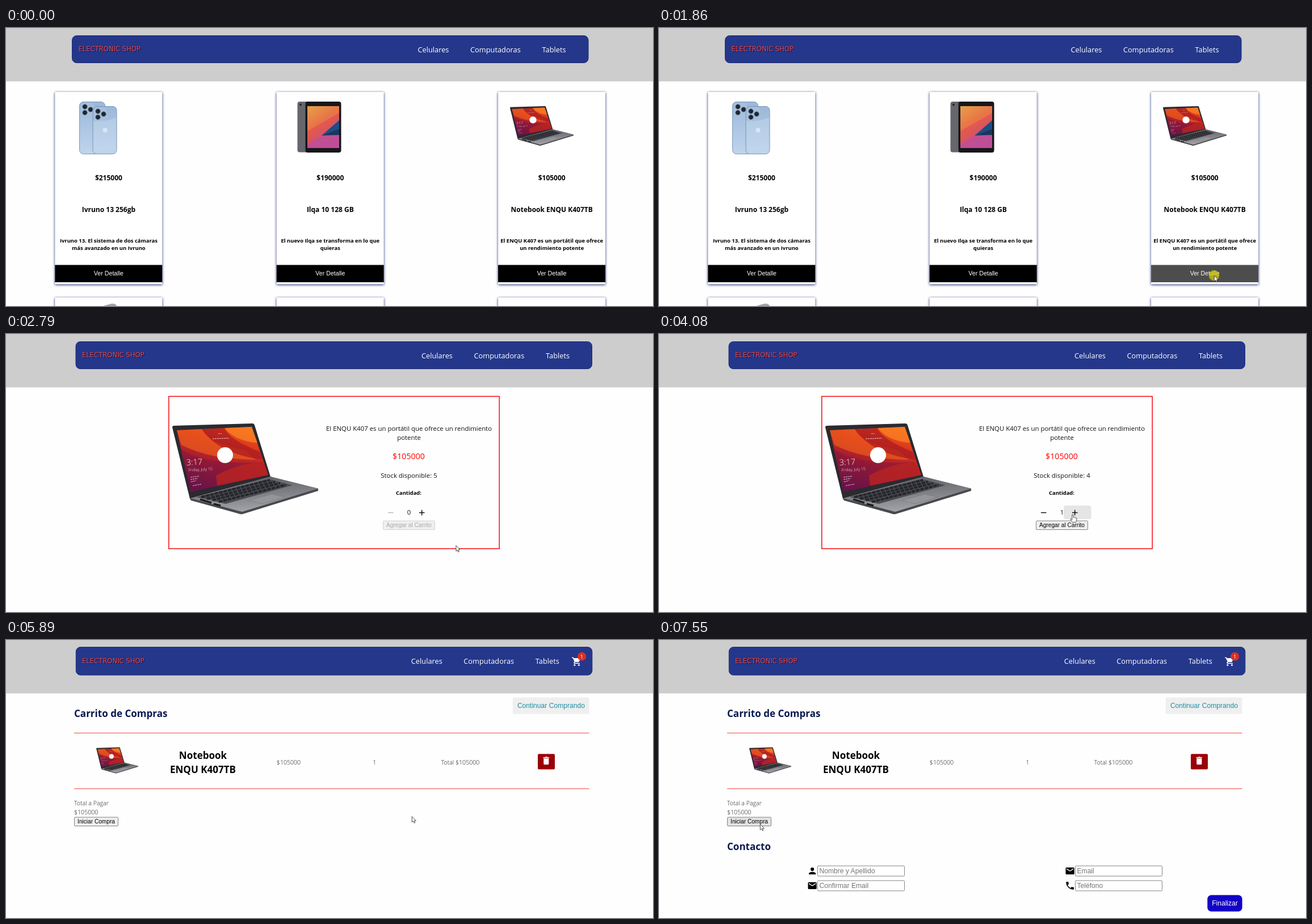
Animation of 1140 by 491 pixels, one loop 8000 ms. Source, as an HTML page:

```html
<!DOCTYPE html>
<html lang="es">
<head>
<meta charset="utf-8">
<title>Tienda</title>
<style>
html, body { margin: 0; width: 100%; height: 100%; overflow: hidden; background: #fefefe; }
svg { display: block; width: 100%; height: 100%; }
text { font-family: "Open Sans", "Noto Sans", sans-serif; }
.mid { text-anchor: middle; }
.bold { font-weight: 700; }
.ui { font-family: "Liberation Sans", Arial, sans-serif; font-size: 10.15px; }
.field { font-family: "Liberation Sans", Arial, sans-serif; font-size: 12.1px; }
.nav { font-size: 12.8px; fill: #fff; }
.logo text { font: 11.6px "DejaVu Sans", sans-serif; }
.price { font-size: 12px; }
.desc { font-size: 9.43px; }
.body { font-size: 11.4px; fill: #111; }
.title { font-size: 17.05px; font-weight: 700; }
.thin { font-size: 10.6px; font-weight: 300; fill: #222; }
.card { fill: #fff; filter: drop-shadow(0 1.5px 2.2px #16256e); }
.btn { fill: #efefef; stroke: #767676; stroke-width: .9; }
.input { fill: #fff; stroke: #858585; stroke-width: 1; }
.outline { fill: #fefefe; stroke: #f20d12; stroke-width: 1.5; }
</style>
</head>
<body>
<svg viewBox="0 0 1140 491" preserveAspectRatio="none">
  <defs>
    <linearGradient id="blue" x2="0" y2="1"><stop stop-color="#9bb8d9"/><stop offset="1" stop-color="#bfd4ec"/></linearGradient>
    <linearGradient id="sunset" x2=".5" y2="1"><stop stop-color="#e5a04a"/><stop offset=".45" stop-color="#e85b45"/><stop offset="1" stop-color="#c54c80"/></linearGradient>
    <linearGradient id="lava" x1=".7" y1="0" x2=".3" y2="1"><stop stop-color="#ee5a1a"/><stop offset=".3" stop-color="#d5301e"/><stop offset=".6" stop-color="#a01c30"/><stop offset="1" stop-color="#561250"/></linearGradient>
    <linearGradient id="metal" x1=".4" x2=".6" y2="1"><stop stop-color="#606166"/><stop offset=".5" stop-color="#808186"/><stop offset="1" stop-color="#a6a7ab"/></linearGradient>

    <g id="camera">
      <rect width="23" height="24" rx="6" fill="#a7c0dd"/>
      <g fill="#1d2530" stroke="#64788f"><circle cx="7" cy="7" r="4.2"/><circle cx="7" cy="17.5" r="4.2"/><circle cx="17" cy="12" r="4.2"/></g>
    </g>
    <g id="phones">
      <rect x="129.5" y="130.5" width="45" height="92" rx="7" fill="url(#blue)" stroke="#7c98b8"/>
      <use href="#camera" x="132" y="132"/>
      <rect x="153" y="138.5" width="42" height="84" rx="7" fill="url(#blue)" stroke="#7c98b8"/>
      <path d="M154 164q20 3 40-6v56q-20 6-40 4z" fill="#c6d9ee" opacity=".45"/>
      <use href="#camera" x="155" y="140"/>
      <circle cx="174.5" cy="180.5" r="4" fill="#dbe6f2"/>
    </g>
    <g id="tablet">
      <rect x="513.5" y="130" width="30" height="89.5" rx="4" fill="#65676c"/>
      <circle cx="519" cy="135.5" r="2" fill="#24262a"/>
      <rect x="527.5" y="130" width="63" height="90" rx="4" fill="#16171b"/>
      <rect x="531" y="138" width="56" height="74" fill="url(#sunset)"/>
      <path d="M556 190L587 163V178z" fill="#1c4d87"/>
      <path d="M556 190L587 178V189z" fill="#17365f"/>
      <path d="M531 206L556 190 587 189V212H531z" fill="#bd4f9d" opacity=".8"/>
      <path d="M531 138H587V150L531 182z" fill="#e9a348" opacity=".35"/>
    </g>
    <g id="laptop">
      <path d="M293 165Q293 162 296 162L434 158Q437 158 438 161L466 252 324 291z" fill="#2a2a2f"/>
      <path d="M301 170L433 164 462 249 325 279z" fill="url(#lava)"/>
      <path d="M301 170L345 168Q355 192 420 205L440 222Q360 222 309 196z" fill="#f0601c" opacity=".65"/>
      <path d="M345 168L385 166Q392 186 447 208L452 222Q375 212 345 168z" fill="#a81a22" opacity=".7"/>
      <path d="M385 166L433 164 443 192Q405 190 385 166z" fill="#ff8a26" opacity=".65"/>
      <path d="M309 204Q350 232 450 226L462 249 325 279z" fill="#7a1440" opacity=".45"/>
      <path d="M370 250Q410 228 454 226L462 249 372 268z" fill="#c0261f" opacity=".7"/>
      <path d="M324 291L466 252 550 273V277L417 318Q413 319 409 317L326 294z" fill="#48494e"/>
      <path d="M325 290L466 252 550 273 416 314z" fill="url(#metal)"/>
      <path d="M336 288L463 256 505 267 387 300z" fill="#4b4c51"/>
      <g stroke="#25262b" stroke-width="4" stroke-dasharray="6.5 1.5">
        <path d="M344 288L465 258M354 291L474 261M364 293.5L483 263.5M375 296.5L493 266.5"/>
      </g>
      <path d="M428 294L468 283 491 288 452 300z" fill="#94959a" stroke="#7c7d82" stroke-width=".7"/>
      <path d="M342 292L362 298M366 300L378 303" stroke="#17181b" stroke-width="3"/>
      <circle cx="386" cy="214" r="14" fill="#fff"/>
      <g fill="#fff" transform="rotate(-3 317 232)">
        <text x="318" y="232" font-size="14.5" font-weight="300">3:17</text>
        <text x="321" y="243" font-size="7" font-weight="300">Friday, July 15</text>
      </g>
      <path d="M325 253L341 251M325 257L338 255M326 261L335 259M329 268L345 265M364 185L393 184M374 176h6" stroke="#fff" opacity=".65" stroke-width="1.2" stroke-dasharray="3 1"/>
    </g>

    <path id="person" d="M12 12a4 4 0 1 0 0-8 4 4 0 0 0 0 8zm0 2c-2.7 0-8 1.3-8 4v2h16v-2c0-2.7-5.3-4-8-4z"/>
    <path id="mail" d="M20 4H4a2 2 0 0 0-2 2v12a2 2 0 0 0 2 2h16a2 2 0 0 0 2-2V6a2 2 0 0 0-2-2zm0 4-8 5-8-5V6l8 5 8-5z"/>
    <path id="tel" d="M6.6 10.8a15 15 0 0 0 6.6 6.6l2.2-2.2a1 1 0 0 1 1-.3 11 11 0 0 0 3.6.6 1 1 0 0 1 1 1V20a1 1 0 0 1-1 1A17 17 0 0 1 3 4a1 1 0 0 1 1-1h3.5a1 1 0 0 1 1 1 11 11 0 0 0 .6 3.6 1 1 0 0 1-.3 1z"/>
    <path id="trash" d="M6 19a2 2 0 0 0 2 2h8a2 2 0 0 0 2-2V7H6zM19 4h-3.5l-1-1h-5l-1 1H5v2h14z"/>
    <g id="trolley"><circle cx="7" cy="20" r="2"/><circle cx="17" cy="20" r="2"/><path d="M1 2v2h2l3.6 7.6-1.4 2.4C4.500 15.4 5.500 17 7 17h12v-2H7l1.1-2h7.5a2 2 0 0 0 1.7-1L21.7 4H5.200l-.9-2z"/></g>

    <g id="brand" class="logo"><text x="128.500" y="41.500" fill="#10143c">ELECTRONIC SHOP</text><text x="127.500" y="41" fill="#e5484a">ELECTRONIC SHOP</text></g>
    <g id="links" class="nav"><text x="725.5" y="43">Celulares</text><text x="818" y="43">Computadoras</text><text x="944.5" y="43">Tablets</text></g>
    <g id="topbar">
      <rect x="116.5" y="13.5" width="909.5" height="48" rx="8" fill="#24378b" stroke="#1b2b72"/>
      <use href="#brand"/><use href="#links"/>
    </g>
    <g id="info" class="mid">
      <text class="body" x="710" y="171">El ENQU K407 es un portátil que ofrece un rendimiento</text>
      <text class="body" x="710" y="187">potente</text>
      <text x="709.5" y="221" font-size="14.2" fill="#f00">$105000</text>
    </g>
    <g id="frame">
      <rect class="outline" x="286.8" y="110.2" width="582.4" height="269"/>
      <use href="#laptop"/>
    </g>
  </defs>

  <rect width="1140" height="491" fill="#fefefe"/>
  <rect width="1140" height="94.300" fill="#cdcdcd"/>

  <g id="shop">
    <use href="#topbar"/>
    <g id="cards"></g>
    <use href="#phones"/><use href="#tablet"/>
    <use href="#laptop" transform="translate(888 138) scale(.436) translate(-293 -158)"/>
    <path d="M171 491l14-4q8-1 10 4z" fill="#a3a5ab"/>
  </g>

  <use id="shifted" href="#topbar" x="6.5"/>
  <rect id="loading" class="outline" x="286.8" y="110.2" width="582.4" height="20"/>

  <g id="detail">
    <use href="#frame"/><use href="#info"/>
    <text id="stock" class="body mid" x="710" y="253.5"></text>
    <text class="bold mid" x="709.5" y="284" font-size="9.4">Cantidad:</text>
    <rect id="plusHover" x="713" y="303" width="48.5" height="24" rx="3.5" fill="#e5e5e5"/>
    <path id="minus" d="M673 315.5h9.5" stroke-width="1.5"/>
    <path d="M728 315.5h9.5M732.7 310.7v9.5" stroke="#111" stroke-width="1.5"/>
    <text id="count" class="body mid" x="710" y="318.5"></text>
    <rect id="addBtn" class="btn" x="664.5" y="330" width="91" height="15.5" rx="1.5"/>
    <text id="addText" class="ui mid" x="710" y="341">Agregar al Carrito</text>
  </g>

  <g id="added">
    <use href="#frame"/><use href="#info" y="29.5"/>
    <text class="body mid" x="710" y="283">Stock disponible: 4</text>
    <rect id="goBtn" class="btn" x="680.5" y="300.5" width="59" height="15.5" rx="1.5"/>
    <text class="ui mid" x="710" y="311.8">Ir al carrito</text>
  </g>

  <g id="cart">
    <rect x="123.3" y="12.5" width="909.5" height="49.5" rx="8" fill="#24378b" stroke="#1b2b72"/>
    <use href="#brand" x="6.5"/><use href="#links" x="-11.7" y="-.6"/>
    <use href="#trolley" fill="#fff" transform="translate(996.5 29) scale(.761)"/>
    <circle cx="1014.7" cy="29" r="7.6" fill="#d93025"/>
    <text class="mid" x="1014.7" y="32.5" font-size="9" fill="#fff">1</text>

    <text class="title" x="120" y="136" fill="#0a1850">Carrito de Compras</text>
    <rect x="893" y="101.5" width="134.5" height="29" fill="#efefef"/>
    <text class="field mid" x="960.4" y="120" fill="#1f8ea3">Continuar Comprando</text>
    <path d="M120 164.3H1027.5M120 262.7H1027.5" stroke="#f96464" stroke-width="1.2"/>
    <use href="#laptop" transform="translate(159 189.5) scale(.288) translate(-293 -158)"/>
    <text class="title mid" x="347" y="210">Notebook</text>
    <text class="title mid" x="347" y="234.5">ENQU K407TB</text>
    <text class="thin mid" x="498" y="220">$105000</text>
    <text class="thin mid" x="649.5" y="220">1</text>
    <text class="thin mid" x="800.5" y="220">Total $105000</text>
    <rect x="937" y="201.3" width="30" height="27.3" rx="2" fill="#9a0008"/>
    <use href="#trash" fill="#fff" transform="translate(942.7 204) scale(.761)"/>
    <text class="thin" x="120" y="291.5">Total a Pagar</text>
    <text class="thin" x="120" y="307.5">$105000</text>
    <rect id="buyBtn" class="btn" x="120.5" y="313" width="77" height="15.5" rx="1.5"/>
    <text class="ui mid" x="159" y="324.4">Iniciar Compra</text>
  </g>

  <g id="form">
    <text class="title" x="120" y="371" fill="#0a1850">Contacto</text>
    <g id="fields"></g>
    <rect x="966.3" y="450.5" width="61.3" height="29" rx="7" fill="#1400c8"/>
    <text class="field mid" x="997" y="469" fill="#fff">Finalizar</text>
  </g>

  <g id="cursor">
    <circle id="ring" r="9.2" fill="#d2c800" opacity=".75"/>
    <path id="arrow" d="M.3.3v10l2.3-2 1.6 3.5 1.6-.7-1.5-3.400h3.1z" fill="#fff" stroke="#222" stroke-width=".8"/>
    <path id="hand" d="M-1.2.5Q0-.7 1.200.5V5Q2.500 4 3.400 5.300 4.700 4.600 5.300 5.800 6.800 5.400 6.900 7V9.500L5.500 13.500H-.5L-4 9Q-4.300 7.300-2.700 7.700L-1.200 9z" fill="#fff" stroke="#222" stroke-width=".8"/>
  </g>
</svg>
<script>
const LOOP = 8000;
const $ = id => document.getElementById(id);
const show = (id, on) => $(id).setAttribute('visibility', on ? 'inherit' : 'hidden');
const within = (t, from, to) => t >= from && t < to;

const products = [
  ['$215000', 'Ivruno 13 256gb', 'Ivruno 13. El sistema de dos cámaras', 'más avanzado en un Ivruno'],
  ['$190000', 'Ilqa 10 128 GB', 'El nuevo Ilqa se transforma en lo que', 'quieras'],
  ['$105000', 'Notebook ENQU K407TB', 'El ENQU K407 es un portátil que ofrece', 'un rendimiento potente'],
];
$('cards').innerHTML = products.map(([price, name, line1, line2], i) => {
  const x = 86.3 + i * 390.4, c = x + 94.6;
  const label = (y, cls, s) => `<text class="mid bold ${cls}" x="${c}" y="${y}">${s}</text>`;
  return `<rect class="card" x="${x}" y="113" width="189" height="339.5"/>
    <rect class="card" x="${x}" y="476" width="189" height="60"/>
    ${label(269, 'price', price)}${label(325, 'price', name)}
    ${label(379.3, 'desc', line1)}${label(392.3, 'desc', line2)}
    <rect id="view${i}" x="${x}" y="418.5" width="189" height="30.5"/>
    <text class="ui mid" style="font-size:10.65px" x="${c}" y="437.3" fill="#fff">Ver Detalle</text>`;
}).join('');

const fields = [
  [279, 398.5, 'person', 'Nombre y Apellido'], [733, 398.5, 'mail', 'Email'],
  [279, 424.5, 'mail', 'Confirmar Email'], [733, 424.5, 'tel', 'Teléfono'],
];
$('fields').innerHTML = fields.map(([x, y, icon, hint]) => `
  <use href="#${icon}" transform="translate(${x - 18} ${y + .3}) scale(.761)"/>
  <rect class="input" x="${x + .5}" y="${y + .5}" width="153" height="18" rx="1.5"/>
  <text class="field" x="${x + 3.5}" y="${y + 13.7}" fill="#757575">${hint}</text>`).join('');

// Pointer moves: first change, last change, steps, target, ease-out power
const start = [1076, 508];
const moves = [
  [440, 1180, 12, 978, 437, 3.4],
  [2450, 2590, 3, 818, 393, 1],
  [2790, 3550, 12, 719, 316, 3.4],
  [3680, 3810, 3, 729, 319, 1],
  [4150, 4480, 6, 728, 341.5, 1.5],
  [5270, 5480, 4, 715, 311.5, 1.5],
  [6220, 6350, 3, 334, 334, 1],
  [6610, 7350, 12, 178, 325, 3],
];
// Time spans in which a click ring surrounds the pointer
const clicks = [[1720, 1920], [3880, 4010], [4680, 4810], [5690, 5890], [7350, 7550]];

function pointer(t) {
  let [x, y] = start;
  for (const [from, to, steps, tx, ty, power] of moves) {
    if (t < from) break;
    const done = Math.min(steps, 1 + Math.floor((t - from) / (to - from) * (steps - 1) + 1e-6));
    const k = 1 - (1 - done / steps) ** power;
    x += (tx - x) * k;
    y += (ty - y) * k;
  }
  return [x, y];
}

function render(t) {
  const [x, y] = pointer(t);
  const over = (l, top, r, b) => x >= l && x < r && y >= top && y < b;
  const tone = (id, hover) => $(id).style.fill = hover ? '#e3e3e3' : '#efefef';
  const chosen = t >= 4010;
  const onPlus = within(t, 3680, 4810) && over(713, 303, 761, 327);

  show('shop', t < 1920);
  show('shifted', within(t, 1920, 5890));
  show('loading', within(t, 1920, 2190));
  show('detail', within(t, 2190, 4810));
  show('added', within(t, 4810, 5890));
  show('cart', t >= 5890);
  show('form', t >= 7550);

  $('view2').style.fill = over(867, 418, 1056, 449) ? '#4d4d4d' : '#000';
  $('stock').textContent = 'Stock disponible: ' + (chosen ? 4 : 5);
  $('count').textContent = chosen ? 1 : 0;
  $('minus').setAttribute('stroke', chosen ? '#111' : '#b8b8b8');
  $('addBtn').style.stroke = chosen ? '#767676' : '#cfcfcf';
  $('addText').style.fill = chosen ? '#000' : '#aaa';
  tone('addBtn', chosen && over(664, 330, 756, 346));
  tone('goBtn', over(680, 300, 740, 316));
  tone('buyBtn', over(120, 313, 198, 329));
  show('plusHover', onPlus);

  show('cursor', t >= 440);
  $('cursor').setAttribute('transform', `translate(${x} ${y})`);
  show('ring', clicks.some(([a, b]) => within(t, a, b)));
  show('arrow', !onPlus);
  show('hand', onPlus);
}

const began = performance.now();
(function tick() {
  render((performance.now() - began) % LOOP);
  requestAnimationFrame(tick);
})();
</script>
</body>
</html>
```
